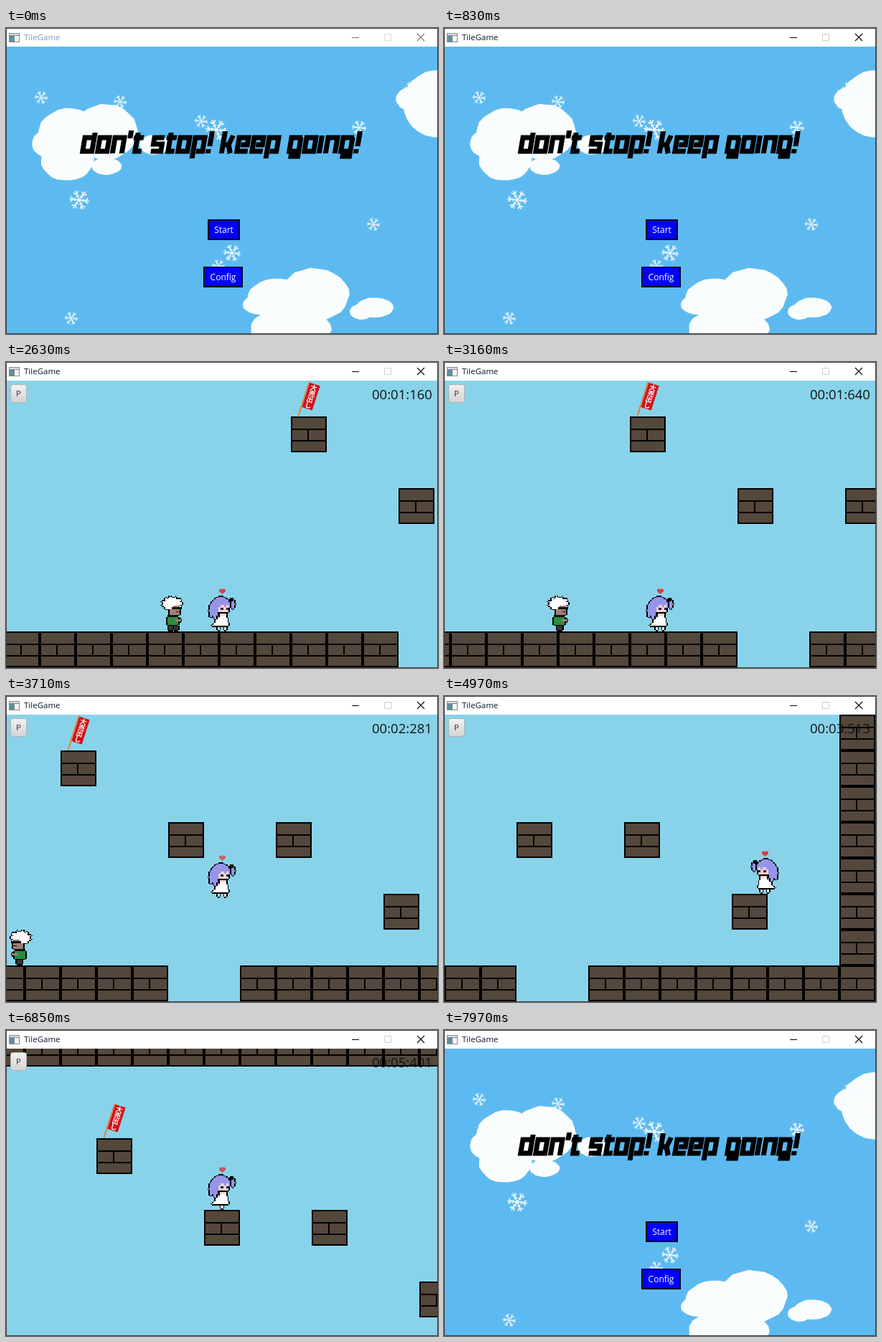
Write an HTML page with a canvas that moves like this. It is 602 px wide and 427 px high and loops after 8000 ms.

```html
<!DOCTYPE html>
<html lang="en">
<head>
<meta charset="utf-8">
<title>TileGame</title>
<style>
html, body { margin: 0; width: 602px; height: 427px; overflow: hidden; background: #fff; }
canvas { display: block; }
</style>
</head>
<body>
<canvas id="stage" width="602" height="427" role="img" aria-label="don't stop! keep going!"></canvas>
<script>
const LOOP = 8000, WAKE = 760, PLAY = 1460, DONE = 7490, MENU = 7970, STEP = 78;
const UI = '"Open Sans", "Noto Sans", sans-serif';
const ctx = document.getElementById('stage').getContext('2d');

function box(x, y, w, h, color) {
  ctx.fillStyle = color;
  ctx.fillRect(x, y, w, h);
}

function label(text, x, y, size, color, align = 'left') {
  ctx.font = `${size}px ${UI}`;
  ctx.textAlign = align;
  ctx.fillStyle = color;
  ctx.fillText(text, x, y);
}

function lines(d, color, width) {
  ctx.strokeStyle = color;
  ctx.lineWidth = width;
  ctx.stroke(new Path2D(d));
}

function seeded(seed) {
  return () => (seed = seed * 16807 % 2147483647) / 2147483647;
}

// ---- window frame ----

function frame(active) {
  const ink = active ? '#000' : '#777';
  box(0, 0, 602, 26, '#fff');
  box(4, 7, 15, 13, '#858b90');
  box(5, 8, 13, 2, '#d8dde2');
  box(5, 11, 6, 8, '#5b8f9c');
  box(12, 11, 6, 8, '#f4f4f4');
  label('TileGame', 25, 17, 11.5, active ? '#0a1830' : '#7d9cc4');
  lines('M482 13.5H492', ink, 1);
  lines('M527.5 8.5H536.5V17.5H527.5Z', active ? '#ccc' : '#ddd', 1);
  lines('M573 8L583 18M583 8L573 18', ink, 1.1);
  lines('M.5 .5H601.5V426.5H.5Z', '#3c3c3c', 1);
}

// ---- menu ----

// A puff is an ellipse with a slightly torn edge.
function puff(x, y, rx, ry) {
  const rnd = seeded(x * 7 + y), count = 26;
  ctx.beginPath();
  for (let i = 0; i < count; i++) {
    const a = i / count * 2 * Math.PI, r = 1.02 - 0.05 * rnd();
    ctx.lineTo(x + rx * r * Math.cos(a), y + ry * r * Math.sin(a));
  }
  ctx.fill();
}

function clouds() {
  ctx.fillStyle = '#fafdfe';
  puff(138, 145, 45, 39);
  puff(88, 149, 44, 37);
  puff(62, 161, 26, 20);
  puff(85, 184, 37, 29);
  puff(140, 193, 21, 12);
  puff(207, 163, 21, 14);
  puff(603, 106, 50, 47);
  puff(567, 99, 24, 17);
  puff(430, 372, 48, 37);
  puff(378, 377, 42, 27);
  puff(352, 386, 22, 14);
  puff(397, 421, 56, 33);
  puff(514, 390, 26, 14);
  puff(495, 396, 16, 11);
}

const flakes = [[49, 97, 10], [159, 103, 10], [272, 130, 10], [293, 142, 16], [492, 139, 11],
  [565, 86, 12], [102, 240, 15], [512, 274, 10], [315, 314, 13], [296, 332, 10], [91, 405, 10]];

function flake([x, y, r]) {
  ctx.save();
  ctx.translate(x, y);
  ctx.rotate(0.12);
  ctx.scale(r / 16, r / 16);
  for (let k = 0; k < 6; k++) {
    lines('M0 0H15M9 0L13 -4M9 0L13 4M5 0L7 -2M5 0L7 2', 'rgba(246,251,255,.9)', 1.9);
    ctx.rotate(Math.PI / 3);
  }
  ctx.restore();
}

// Display lettering as strokes.
const letters = {
  d: 'M13 -7V19H0V0H13', o: 'M0 0H13V19H0Z', n: 'M0 22V0H13V22', "'": 'M0 -10V1',
  t: 'M3 -7V19H12M-2 0H12', s: 'M14 0H0V9H12V19H-2', p: 'M0 29V0H13V19H4',
  k: 'M0 -9V22M0 10H8L12 -3M8 10L12 22', e: 'M15 19H0V0H13V10H4',
  g: 'M15 0H0V19H12M13 0V26H0', i: 'M0 -3V22', '!': 'M1 -9V12M0 16V22', ' ': ''
};
const narrow = { s: 19, t: 17, ' ': 10, i: 9, '!': 9, "'": 7 };

function heading(text, x, y) {
  for (const ch of text) {
    ctx.save();
    ctx.transform(1, 0, -0.17, 1, x, y);
    lines(letters[ch], '#000', 7);
    ctx.restore();
    x += narrow[ch] || 21;
  }
}

function button(text, x, y, w) {
  box(x, y, w, 29, '#00001c');
  box(x + 2, y + 2, w - 4, 25, '#0000fd');
  label(text, x + w / 2, y + 19, 12, '#fff', 'center');
}

function menu() {
  box(0, 26, 602, 401, '#5dbaf0');
  clouds();
  flakes.forEach(flake);
  heading("don't stop! keep going!", 110, 153);
  button('Start', 281, 267, 45);
  button('Config', 275, 333, 55);
}

// ---- sprites: shapes snapped to a 32-cell grid, outlined in black ----

const oval = (x, y, rx, ry) => `M${x - rx} ${y}a${rx} ${ry} 0 1 0 ${2 * rx} 0a${rx} ${ry} 0 1 0 ${-2 * rx} 0Z`;
const rect = (x, y, w, h) => `M${x} ${y}h${w}v${h}h${-w}Z`;

function spikes(x, y, rx, ry, count) {
  let d = '';
  for (let i = 0; i < 2 * count; i++) {
    const a = i / count * Math.PI, r = i % 2 ? 0.68 : 1;
    d += `${i ? 'L' : 'M'}${x + rx * r * Math.cos(a)} ${y + ry * r * Math.sin(a)}`;
  }
  return d + 'Z';
}

function sprite(shapes) {
  const c = document.createElement('canvas'), size = 32, cell = 50 / size;
  c.width = c.height = size;
  const g = c.getContext('2d');
  const paths = shapes.map(([color, d]) => [color, new Path2D(d)]).reverse();
  const colorAt = (i, j) => {
    const hit = paths.find(([, p]) => g.isPointInPath(p, (i + 0.5) * cell, (j + 0.5) * cell));
    return hit && hit[0];
  };
  for (let j = 0; j < size; j++) {
    for (let i = 0; i < size; i++) {
      const edge = colorAt(i - 1, j) || colorAt(i + 1, j) || colorAt(i, j - 1) || colorAt(i, j + 1);
      g.fillStyle = colorAt(i, j) || (edge ? '#000' : 'transparent');
      g.fillRect(i, j, 1, 1);
    }
  }
  return c;
}

const lilac = '#9695ea', skin = '#f3d2cd', tan = '#a17f74';

const girl = [0, 4.5].map(gap => sprite([
  [lilac, oval(10, 21, 3, 9)],
  [lilac, oval(40, 12, 3, 6)],
  [lilac, oval(23, 13, 13, 11)],
  [lilac, oval(15, 24, 3.5, 9)],
  ['#000', rect(36, 5, 5, 3)],
  [skin, rect(20, 13, 14, 11)],
  [lilac, rect(19, 10, 5, 6) + rect(28, 10, 4, 5)],
  ['#25204a', rect(23, 17, 3, 3) + rect(31, 17, 3, 3)],
  [skin, rect(22, 25, 9, 5)],
  ['#fff', 'M22 28H31L35 42H11Z'],
  ['#fff', rect(23 - gap, 43, 4, 5) + rect(23 + gap, 43, 4, 5)]
]));

const rival = [0, 4].map(gap => sprite([
  ['#fff', spikes(25, 11, 16, 11, 11)],
  [tan, rect(22, 14, 14, 12)],
  ['#fff', rect(18, 12, 8, 7)],
  ['#111', rect(25, 15, 12, 4) + rect(31, 22, 5, 2) + rect(21, 26, 12, 3)],
  ['#2e8b3c', rect(19, 29, 16, 12)],
  [tan, rect(29, 33, 8, 3)],
  ['#333', rect(24 - gap, 42, 7, 6) + rect(24 + gap, 42, 7, 6)]
]));

function put(img, x, y, dir) {
  ctx.save();
  ctx.imageSmoothingEnabled = false;
  ctx.translate(x + 25, y);
  ctx.scale(dir, 1);
  ctx.drawImage(img, -25, 0, 50, 50);
  ctx.restore();
}

// ---- level ----

const tiles = [[450, 150], [600, 250], [750, 250], [900, 350]];
for (let x = 0; x < 1100; x += 50) {
  tiles.push([x, 0]);
  if (x !== 600 && x !== 650) tiles.push([x, 450]);
}
for (let y = 50; y < 450; y += 50) tiles.push([0, y], [1050, y]);

function brick(x, y) {
  box(x, y, 50, 50, '#54473b');
  ctx.save();
  ctx.translate(x, y);
  lines('M1 1H49V49H1ZM0 18H50M0 34H50M24 18V34', '#000', 2);
  ctx.restore();
}

function flag(x, y) {
  ctx.save();
  ctx.translate(x + 10.5, y - 1);
  ctx.rotate(0.31);
  lines('M0 0V-49', '#dd8238', 2);
  box(1, -49, 15, 36, '#cf1219');
  ctx.font = 'bold 9.5px "Noto Sans CJK JP", "Noto Sans CJK", sans-serif';
  ctx.textAlign = 'center';
  ctx.fillStyle = '#fff';
  [...'大売出し'].forEach((ch, i) => ctx.fillText(ch, 8.5, -40 + i * 8.5));
  ctx.restore();
}

function heart(x, y, phase) {
  ctx.save();
  ctx.translate(x, y);
  ctx.globalAlpha = 0.85 + 0.15 * Math.sin(phase);
  ctx.fillStyle = '#d9383f';
  ctx.fill(new Path2D('M0 4L-4.5 0V-2L-3 -3.5H-1L0 -2.3L1 -3.5H3L4.5 -2V0Z'));
  ctx.restore();
}

// ---- motion ----

const GRAVITY = 1157, JUMP = 490;
const route = [[2360, 250], [4668, 928], [4940, 928], [5640, 760], [5900, 760],
  [6650, 590], [6750, 600], [6940, 600], [7490, 470]];
const jumps = [3169, 4080, 5010, 5900, 6940];
const floors = [400, 400, 300, 200, 200, 100];
const clock = [[0, 0], [1, 72], [15, 1160], [29, 2281], [45, 3513], [69, 5401], [77, 6041]];

const clamp = (v, max) => Math.max(0, Math.min(max, v));

// Linear value at t, with the slope of the leg in progress and the last direction.
function track(keys, t) {
  let value = keys[0][1], slope = 0, dir = 1;
  for (let i = 1; i < keys.length && t > keys[i - 1][0]; i++) {
    const [a, from] = keys[i - 1], [b, to] = keys[i];
    slope = (to - from) / (b - a);
    dir = Math.sign(slope) || dir;
    value = from + slope * (Math.min(t, b) - a);
  }
  return { value, slope, dir };
}

function arc(ms, from, speed, floor) {
  const s = ms / 1000, y = from - speed * s + GRAVITY * s * s / 2;
  return s > speed / GRAVITY ? Math.min(y, floor) : y;
}

function height(t) {
  const n = jumps.filter(j => j <= t).length;
  return n ? arc(t - jumps[n - 1], floors[n - 1], JUMP, floors[n]) : arc(t - PLAY, 200, 0, floors[0]);
}

function clockText(ms) {
  const pad = (v, n) => String(Math.floor(v)).padStart(n, '0');
  return `${pad(ms / 60000, 2)}:${pad(ms / 1000 % 60, 2)}:${pad(ms % 1000, 3)}`;
}

function pauseButton() {
  const shade = ctx.createLinearGradient(0, 31, 0, 57);
  shade.addColorStop(0, '#f2f2f2');
  shade.addColorStop(1, '#d2d2d2');
  ctx.beginPath();
  ctx.roundRect(6.5, 31.5, 22, 25, 3);
  ctx.fillStyle = shade;
  ctx.fill();
  ctx.strokeStyle = '#b0b0b0';
  ctx.lineWidth = 1;
  ctx.stroke();
  label('P', 17.5, 48, 11.5, '#333', 'center');
}

function game(time) {
  const n = Math.max(0, Math.floor((Math.min(time, DONE) - PLAY + 12) / STEP));
  const t = PLAY + n * STEP;
  const { value: x, slope, dir } = track(route, t);
  const y = height(t);
  const dx = 1 - Math.round(clamp(x - 275, 500));
  const dy = 26 - Math.round(clamp(y - 175, 100));

  box(0, 26, 602, 401, '#89d3ea');
  for (const [tx, ty] of tiles) {
    const sx = tx + dx, sy = ty + dy;
    if (sx > -50 && sx < 602 && sy > -24 && sy < 427) brick(sx, sy);
  }
  flag(450 + dx, 150 + dy);

  // The rival paces between 104 and 392.
  const pace = Math.max(0, 0.142 * (t - 1540)) % 576;
  put(rival[n >> 1 & 1], Math.round(392 - Math.abs(288 - pace) + dx),
    Math.round(arc(t - PLAY, 300, 0, 400) + dy), pace > 288 ? -1 : 1);

  const gx = Math.round(x + dx), gy = Math.round(y + dy);
  put(girl[slope ? n & 1 : 0], gx, gy, dir);
  heart(gx + 25.5, gy - 6, n);

  pauseButton();
  label(clockText(Math.round(track(clock, n).value)), 510, 52, 18.5, '#111');
}

function draw(t) {
  if (t >= PLAY && t < MENU) game(t);
  else menu();
  frame(t >= WAKE);
}

const start = performance.now();
function tick() {
  draw((performance.now() - start) % LOOP);
  requestAnimationFrame(tick);
}
tick();
</script>
</body>
</html>
```
